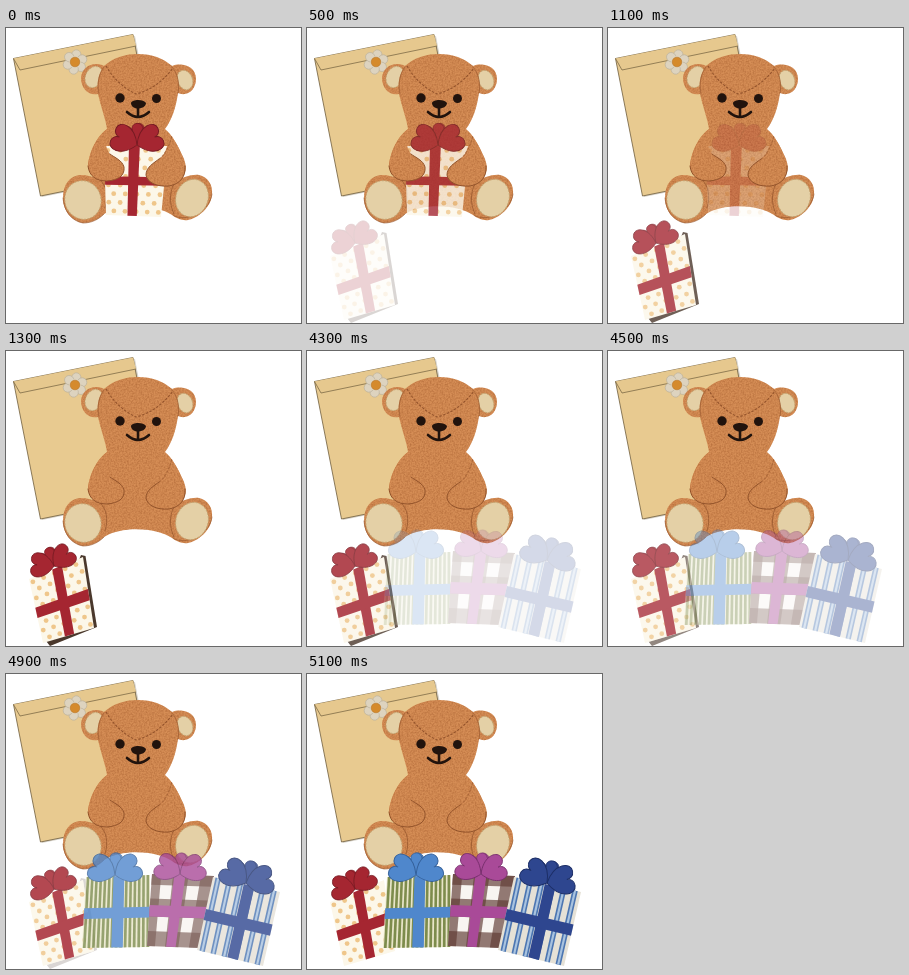
Write an HTML page that moves like this. It is 295 by 295 pixels and loops after 8 s.

```html
<!DOCTYPE html>
<html lang="en">
<head>
<meta charset="utf-8">
<title>Bear and gifts</title>
<style>
  html, body { margin: 0; width: 100%; height: 100%; overflow: hidden; background: #fff; }
  svg { display: block; width: 100vw; height: 100vh; }
  #held, #shadowed, #row { animation: 8s step-end infinite; }
  #held { animation-name: held; }
  #shadowed { animation-name: shadowed; }
  #row { animation-name: row; }
  @keyframes held {
    0% { opacity: 1; } 6.25% { opacity: .8; } 8.75% { opacity: .6; }
    11.25% { opacity: .4; } 13.75% { opacity: .2; } 16.25%, 100% { opacity: 0; }
  }
  @keyframes shadowed {
    0% { opacity: 0; } 6.25% { opacity: .2; } 8.75% { opacity: .4; }
    11.25% { opacity: .6; } 13.75% { opacity: .8; } 16.25% { opacity: 1; }
    53.75% { opacity: .8; } 56.25% { opacity: .6; } 58.75% { opacity: .4; }
    61.25% { opacity: .2; } 63.75%, 100% { opacity: 0; }
  }
  @keyframes row {
    0% { opacity: 0; } 53.75% { opacity: .2; } 56.25% { opacity: .4; }
    58.75% { opacity: .6; } 61.25% { opacity: .8; } 63.75%, 100% { opacity: 1; }
  }
  .felt { fill: #d58d55; filter: url(#felt); }
  .seam { fill: none; stroke: #94532b; stroke-width: 1.1; stroke-dasharray: 2.4 1.6; }
  .edge { fill: none; stroke: #91522a; stroke-width: 1; stroke-linecap: round; }
  .pad { fill: #e4d0a6; stroke: #c4a573; stroke-width: 1; stroke-dasharray: 2 1.3; }
  .face { fill: none; stroke: #21130d; stroke-width: 2.6; stroke-linecap: round; }
</style>
</head>
<body>
<svg viewBox="0 0 295 295" xmlns="http://www.w3.org/2000/svg">
  <defs>
    <filter id="felt" x="0" y="0" width="100%" height="100%" color-interpolation-filters="sRGB">
      <feTurbulence type="fractalNoise" baseFrequency=".6" numOctaves="2" seed="4"/>
      <feColorMatrix values="0 0 0 0 .55  0 0 0 0 .27  0 0 0 0 .1  .7 0 0 0 -.24"/>
      <feComposite in2="SourceGraphic" operator="in" result="grain"/>
      <feMerge><feMergeNode in="SourceGraphic"/><feMergeNode in="grain"/></feMerge>
    </filter>
    <path id="heart" d="M0 0C-16-9-14-23-6-23C-2-23 0-20 0-17C0-20 2-23 6-23C14-23 16-9 0 0Z"/>
  </defs>

  <g stroke-linejoin="round">
    <path d="M9 32L129 8L155 145L36 169Z" fill="#bdb6a8" opacity=".6"/>
    <path d="M7.500 30.500L127 6.500L153 144L34.500 168Z" fill="#e8ca90" stroke="#6f5d3d" stroke-width=".8"/>
    <path d="M7.500 30.500L127 6.500L130 18L14 42Z" fill="#e6c88e"/>
    <path d="M7.500 30.500L14 42L130 18" fill="none" stroke="#6f5d3d" stroke-width=".7"/>
  </g>
  <g id="flower" transform="translate(69 34)"></g>

  <path class="felt" d="M98 38C108 29 120 26 132 26C146 26 157 30 166 38C176 34 190 38 190 51C190 62 181 69 172 65C170 79 166 92 159 101C166 107 172 117 178 131C182 142 179 148 172 152C176 150 185 146 193 147C202 149 207 157 206 166C205 180 192 190 182 192C176 193 170 190 166 187C150 176 115 175 98 186C92 192 84 195 77 195C66 193 57 183 57 170C57 156 64 148 74 147C82 147 88 149 94 152C86 150 82 144 82 136C84 122 91 108 101 101C100 92 95 79 92 66C82 68 75 60 75 50C76 38 88 33 98 38Z"/>
  <ellipse class="pad" cx="88" cy="49" rx="8.5" ry="11" transform="rotate(25 88 49)"/>
  <ellipse class="pad" cx="179" cy="52" rx="7.5" ry="10" transform="rotate(-22 179 52)"/>
  <path class="felt" d="M98 38C92 46 90 57 93 66L104 62L106 36ZM166 38C172 45 174 57 172 65L162 62L159 36Z"/>
  <path class="edge" d="M98 39C92 47 91 57 93 66M166 39C172 46 174 57 172 65" opacity=".6"/>
  <path class="seam" d="M100 38C107 50 117 60 130 66C146 62 158 52 167 40"/>
  <path class="edge" d="M57 170C58 184 66 193 77 195C85 195 92 192 98 186M167 187C178 195 204 185 206 166" opacity=".6"/>
  <path class="edge" d="M94 152C100 157 103 168 99 180M170 153C164 160 162 174 168 186" opacity=".7"/>
  <ellipse class="pad" cx="77" cy="172" rx="18" ry="19.5" transform="rotate(-20 77 172)"/>
  <ellipse class="pad" cx="186" cy="170" rx="16" ry="19" transform="rotate(20 186 170)"/>
  <g fill="#21130d">
    <circle cx="114" cy="70" r="4.7"/>
    <circle cx="150.5" cy="70.5" r="4.5"/>
    <path d="M125 75C126 71 138 71 140 75C140 79 135 80 132 81C129 80 125 79 125 75Z"/>
  </g>
  <path class="face" d="M132 79V87M121 84Q132 94 143 84"/>

  <g id="held"></g>

  <path class="felt" d="M101 101C90 110 84 124 82 136C82 147 90 153 101 153C112 152 119 148 118 139C116 132 109 130 104 126C99 120 98 110 101 101Z"/>
  <path class="felt" d="M161 103C169 111 175 124 179 136C181 148 174 156 163 158C150 159 141 154 140 147C140 139 148 135 153 131C161 125 163 115 161 103Z"/>
  <path class="edge" d="M82 138C83 148 90 153 101 153C112 152 119 148 118 139C116 132 109 130 104 126M179 138C180 149 174 156 163 158C150 159 141 154 140 147C140 139 148 135 153 131"/>
  <path class="seam" d="M153 131C159 127 163 118 166 108" opacity=".6"/>

  <g id="shadowed"><path d="M75 204L79.500 205L91 276L44 295L40 290Z" fill="#4a382c"/></g>
  <g id="row"></g>
</svg>
<script>
  const NS = 'http://www.w3.org/2000/svg';

  function add(parent, tag, attrs) {
    const node = document.createElementNS(NS, tag);
    for (const key in attrs) node.setAttribute(key, attrs[key]);
    return parent.appendChild(node);
  }

  // Maps box coordinates (0..1) into the four corners TL, TR, BR, BL.
  const mapper = ([a, b, c, d]) => (u, v) => [0, 1].map(i =>
    (a[i] * (1 - u) + b[i] * u) * (1 - v) + (d[i] * (1 - u) + c[i] * u) * v);

  function patch(parent, at, u0, u1, v0, v1, fill, opacity = 1) {
    const points = [at(u0, v0), at(u1, v0), at(u1, v1), at(u0, v1)].join(' ');
    add(parent, 'polygon', { points, fill, 'fill-opacity': opacity });
  }

  const patterns = {
    dots(g, at) {
      for (let row = 0; row < 8; row++)
        for (let col = 0; col < 5; col++) {
          const [cx, cy] = at((col + (row % 2 ? .72 : .28)) / 5, (row + .5) / 8);
          add(g, 'circle', { cx, cy, r: 2.4, fill: '#efc68a' });
        }
    },
    stripes(g, at) {
      for (let i = 0; i < 15; i++) patch(g, at, (i + .2) / 15, (i + .8) / 15, 0, 1, '#7d8c4c');
    },
    plaid(g, at) {
      for (const [from, to] of [[0, .15], [.34, .59], [.79, 1]]) {
        patch(g, at, from, to, 0, 1, '#5f3a33', .66);
        patch(g, at, 0, 1, from, to, '#5f3a33', .66);
      }
    },
    ticking(g, at) {
      for (let i = 0; i < 6; i++) {
        const u = (i + .3) / 6;
        patch(g, at, u - .012, u + .068, 0, 1, '#4c76b2');
        patch(g, at, u + .012, u + .044, 0, 1, '#a9c3df');
      }
    }
  };

  function gift(parent, { corners, paper, pattern, ribbon, edge, across, down, bow }) {
    const g = add(parent, 'g', {});
    const at = mapper(corners);
    patch(g, at, 0, 1, 0, 1, paper);
    patterns[pattern](g, at);
    patch(g, at, ...down, 0, 1, ribbon);
    patch(g, at, 0, 1, ...across, ribbon);
    const [x, y, turn, size] = bow;
    const knot = add(g, 'g', {
      transform: `translate(${x} ${y}) rotate(${turn}) scale(${size})`,
      fill: ribbon, stroke: edge, 'stroke-width': .8
    });
    for (const [angle, scale] of [[26, .92], [-18, .92], [66, 1.15], [-66, 1.15]])
      add(knot, 'use', { href: '#heart', transform: `rotate(${angle}) scale(${scale})` });
  }

  const red = { paper: '#fcf7e9', pattern: 'dots', ribbon: '#a52631', edge: '#741a22' };
  const dotted = {
    ...red, corners: [[23, 228], [77, 206], [88, 277], [37, 292]],
    across: [.45, .61], down: [.43, .61], bow: [48, 215, -20, .87]
  };
  const held = {
    ...red, corners: [[98, 118], [162, 118], [155, 189], [100, 187]],
    across: [.44, .56], down: [.39, .56], bow: [131, 117, 0, .98]
  };
  const others = [
    {
      corners: [[80, 203], [144, 201], [144, 273], [76, 274]], paper: '#e8e5c8', pattern: 'stripes',
      ribbon: '#4f87cc', edge: '#335f99', across: [.44, .59], down: [.43, .6], bow: [109, 201, 0, 1]
    },
    {
      corners: [[146, 200], [208, 202], [194, 274], [141, 272]], paper: '#f8f5f1', pattern: 'plaid',
      ribbon: '#a94a98', edge: '#772f6c', across: [.43, .59], down: [.36, .54], bow: [174, 200, 2, .95]
    },
    {
      corners: [[207, 203], [274, 218], [257, 292], [191, 276]], paper: '#e5e1d6', pattern: 'ticking',
      ribbon: '#2e468f', edge: '#1c2e66', across: [.44, .59], down: [.46, .62], bow: [240, 209, 14, 1.03]
    }
  ];

  const flower = document.getElementById('flower');
  for (let i = 0; i < 6; i++)
    add(flower, 'ellipse', {
      cy: -7.5, rx: 4.6, ry: 4.8, fill: '#ddd3bf', stroke: '#b9b09c', 'stroke-width': .6,
      transform: `rotate(${i * 60 + 10})`
    });
  add(flower, 'circle', { r: 6, fill: '#ddd3bf' });
  add(flower, 'circle', { r: 4.8, fill: '#d58a2c', stroke: '#b9782a', 'stroke-width': .6 });

  gift(document.getElementById('held'), held);
  gift(document.getElementById('shadowed'), dotted);
  for (const spec of [dotted, ...others]) gift(document.getElementById('row'), spec);
</script>
</body>
</html>
```
